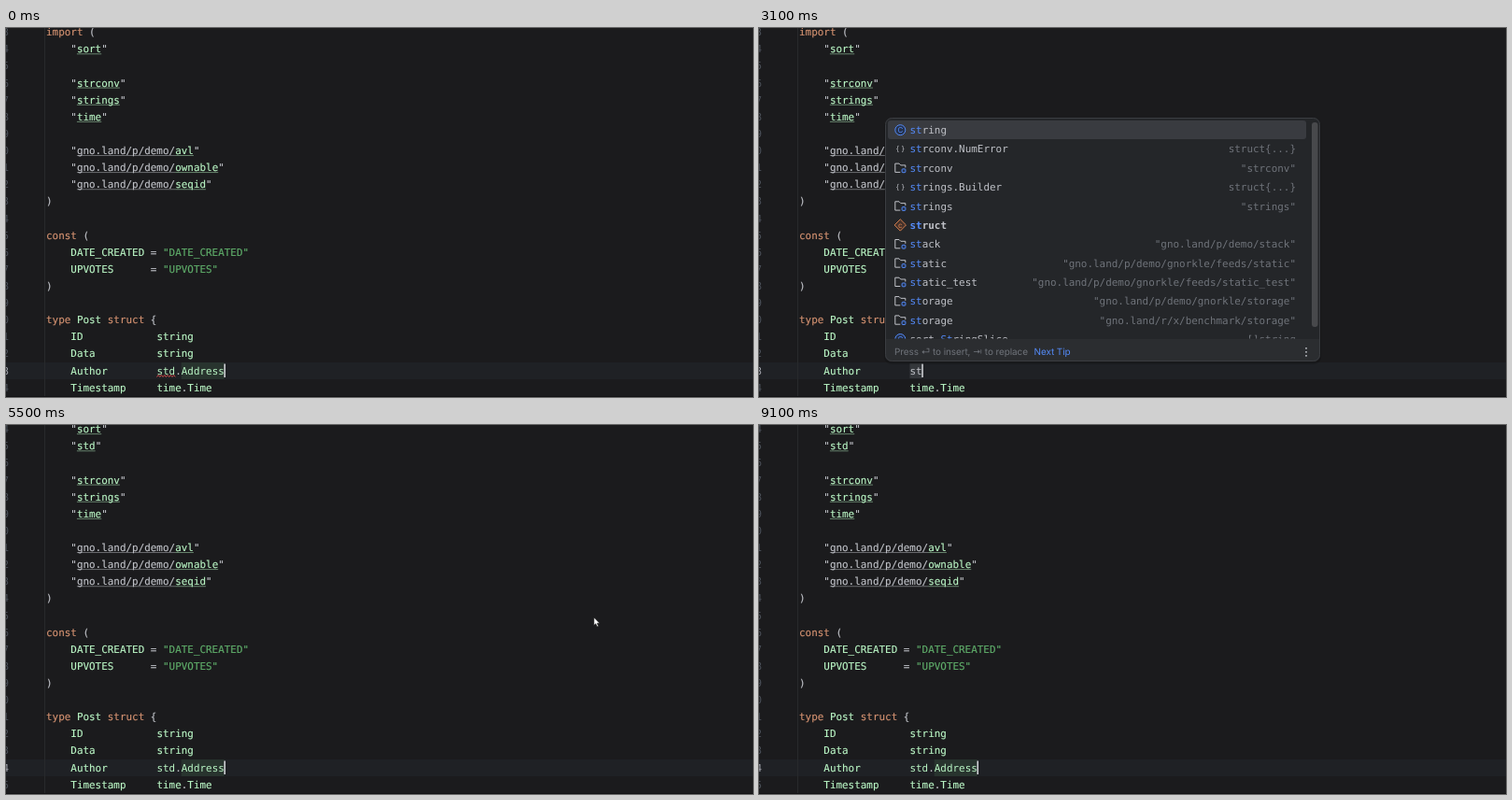
Recreate the animation shown at these times as an HTML page. Size 800 px wide and 395 px high, loop 9.2 s.

```html
<!DOCTYPE html>
<html lang="en">
<head>
<meta charset="utf-8">
<title>Code completion</title>
<style>
  html, body { margin: 0; width: 100%; height: 100%; overflow: hidden; background: #1b1b1d; }
  svg { display: block; width: 800px; height: 395px; }
  text { white-space: pre; text-rendering: geometricPrecision; }
  .mono { font: 10.93px "JetBrains Mono", "DejaVu Sans Mono", "Noto Sans Mono", monospace; }
  .bold { font-weight: 700; }
  .ui { font: 9.95px Inter, "DejaVu Sans", sans-serif; letter-spacing: -.08px; }
  .icon { font: 8px Inter, sans-serif; text-anchor: middle; }
</style>
</head>
<body>
<svg id="stage" viewBox="0 0 800 395"></svg>
<script>
const LOOP = 9200, STEP = 100;
const CW = 6.58, LEFT = 43, TOP = 4.3, LINE = 18.12, ROW = 20.35, BASE = 3.9;
const C = {
  plain: '#bfc1c7', green: '#b9f5c4', string: '#5fad6a', key: '#d39170',
  blue: '#548af7', dim: '#6f737a', red: '#db5c5c', orange: '#d5804f'
};
const TOKEN = { k: C.key, g: C.green, s: C.string, u: C.green, v: C.plain };

const stage = document.getElementById('stage');

function el(parent, tag, attrs = {}, text) {
  const node = document.createElementNS('http://www.w3.org/2000/svg', tag);
  for (const name in attrs) node.setAttribute(name, attrs[name]);
  if (text !== undefined) node.textContent = text;
  return parent.appendChild(node);
}
const rect = (p, x, y, width, height, fill, rx = 0) =>
  el(p, 'rect', { x, y, width, height, fill, rx });
const label = (p, x, y, text, fill, more = {}) =>
  el(p, 'text', { class: 'mono', x, y, fill, ...more }, text);
const show = (node, on) => node.setAttribute('visibility', on ? 'visible' : 'hidden');
const colX = col => LEFT + col * CW;
const rowY = row => TOP + row * LINE;

// Markup: [k:text] sets the token kind; the rest is plain.
function codeLine(parent, row, source) {
  let col = 0;
  for (const part of source.match(/\[\w:[^\]]*\]|[^\[]+/g) || []) {
    const token = part.match(/^\[(\w):(.*)\]$/);
    const kind = token && token[1], text = token ? token[2] : part;
    const fill = TOKEN[kind] || C.plain, x = colX(col);
    const lead = text.length - text.trimStart().length;
    label(parent, x + lead * CW, rowY(row) + BASE, text.trimStart(), fill,
      { stroke: fill, 'stroke-width': .15 });
    if (kind === 'u' || kind === 'v')
      rect(parent, x, rowY(row) + 5, text.length * CW, .8, fill).setAttribute('opacity', .6);
    col += text.length;
  }
}

function header(lines, firstNumber) {
  const g = el(stage, 'g');
  lines.forEach((line, i) => codeLine(g, i, line));
  for (let i = 0; i < 22; i++)
    label(g, -3.6, rowY(i) + BASE, (firstNumber + i) % 10, i === 20 ? '#a1a3ab' : '#4b5059');
  return g;
}

// Editor
rect(stage, 0, 0, 800, 395, '#1b1b1d');
rect(stage, 0, 358, 800, 18, '#1f2125');
rect(stage, 41, 0, 1, 395, '#28292c');
const nameMark = rect(stage, colX(22), 358, 0, 18, '#28342e');
const prefixMark = rect(stage, colX(18), 359, 2 * CW, 16, '#34373b');

const before = header(['[k:import] (', '    "[u:sort]"'], 3);
const after = header(['    "[u:sort]"', '    "[u:std]"'], 4);

[
  '    "[u:strconv]"',
  '    "[u:strings]"',
  '    "[u:time]"',
  '',
  '    "[v:gno.land/p/demo/][u:avl]"',
  '    "[v:gno.land/p/demo/][u:ownable]"',
  '    "[v:gno.land/p/demo/][u:seqid]"',
  ')',
  '',
  '[k:const] (',
  '    [g:DATE_CREATED] = [s:"DATE_CREATED"]',
  '    [g:UPVOTES]      = [s:"UPVOTES"]',
  ')',
  '',
  '[k:type] [g:Post] [k:struct] {',
  '    [g:ID]            [g:string]',
  '    [g:Data]          [g:string]',
  '    [g:Author]',
  '    [g:Timestamp]     [g:time].[g:Time]'
].forEach((line, i) => codeLine(stage, i + 3, line));

const typedY = rowY(20) + BASE;
const pkg = label(stage, colX(18), typedY, '', C.green);
const dot = label(stage, colX(21), typedY, '.', C.plain);
const member = label(stage, colX(22), typedY, '', C.green);
const squiggle = el(stage, 'path', {
  d: 'M161.5 373.5' + 'l1.65 -2l1.65 2'.repeat(6), fill: 'none', stroke: '#e0504f', 'stroke-width': .9
});
const caret = rect(stage, 0, 359.5, 1.5, 14.5, '#d8dade');
rect(stage, 0, 394, 800, 1, '#111113');

// Completion popups
function icon(p, kind, x, y) {
  const letter = (text, fill) => el(p, 'text', { class: 'icon', x, y: y + 2.9, fill }, text);
  const disc = (text, color, fill) => {
    el(p, 'circle', { cx: x, cy: y, r: 5.5, fill, stroke: color });
    letter(text, color);
  };
  if (kind === 'C') disc('C', C.blue, '#25324d');
  if (kind === 'f') disc('f', C.red, '#402929');
  if (kind === 'K') {
    el(p, 'path', { d: `M${x} ${y - 6.2}l6.2 6.2l-6.2 6.2l-6.2 -6.2z`, fill: '#45322b',
      stroke: C.orange, 'stroke-linejoin': 'round' });
    letter('c', C.orange);
  }
  if (kind === 'B') letter('{ }', C.plain);
  if (kind === 'P') {
    el(p, 'path', { d: `M${x + 5.5} ${y - .5}v-2.5h-5l-1.8 -1.8h-4.2v9.3h5.5`, fill: 'none',
      stroke: C.plain, 'stroke-linejoin': 'round' });
    el(p, 'rect', { x: x + 1.8, y: y + 1, width: 3.8, height: 3.8, rx: .8,
      fill: '#25324d', stroke: C.blue });
  }
}

// The matched part of a name is the prefix, or else its last occurrence.
function itemName(p, x, y, name, match) {
  const text = label(p, x, y, '', C.plain, { class: name === 'struct' ? 'mono bold' : 'mono' });
  const start = name.startsWith(match) ? 0 : name.toLowerCase().lastIndexOf(match);
  const end = start + match.length;
  el(text, 'tspan', {}, name.slice(0, start));
  el(text, 'tspan', { fill: C.blue }, name.slice(start, end));
  el(text, 'tspan', {}, name.slice(end));
}

function popup(x, items, match, hint, linkX, thumb) {
  const g = el(stage, 'g');
  el(g, 'rect', { x: x - 1, y: 97, width: 468, height: 263, rx: 8, fill: '#000', opacity: .18 });
  rect(g, x, 96, 466, 261, '#242629', 7);
  const list = el(g, 'svg', { x: 0, y: 0, width: 800, height: 332.5 });
  rect(list, x + 3, 99, 448, 20, '#393b40', 3);
  items.forEach(([kind, name, info], i) => {
    const y = 109.2 + i * ROW;
    icon(list, kind, x + 16.3, y);
    itemName(list, x + 26.5, y + BASE, name, match);
    label(list, x + 440, y + BASE, info, C.dim, { 'text-anchor': 'end' });
  });
  rect(g, x + 457, 101, 6.5, thumb, '#48494c', 3);
  el(g, 'path', { d: `M${x} 333h466v17a7 7 0 0 1 -7 7h-452a7 7 0 0 1 -7 -7z`, fill: '#2b2d30' });
  el(g, 'rect', { x: x + .5, y: 96.5, width: 465, height: 260, rx: 7, fill: 'none', stroke: '#3b3d41' });
  label(g, x + 10, 350, hint, C.dim, { class: 'ui' });
  label(g, x + linkX, 350, 'Next Tip', C.blue, { class: 'ui' });
  for (const y of [342.8, 346.8, 350.8]) el(g, 'circle', { cx: x + 451, cy: y, r: .9, fill: '#ced0d6' });
  return g;
}

const words = popup(135, [
  ['C', 'string', ''],
  ['B', 'strconv.NumError', 'struct{...}'],
  ['P', 'strconv', '"strconv"'],
  ['B', 'strings.Builder', 'struct{...}'],
  ['P', 'strings', '"strings"'],
  ['K', 'struct', ''],
  ['P', 'stack', '"gno.land/p/demo/stack"'],
  ['P', 'static', '"gno.land/p/demo/gnorkle/feeds/static"'],
  ['P', 'static_test', '"gno.land/p/demo/gnorkle/feeds/static_test"'],
  ['P', 'storage', '"gno.land/p/demo/gnorkle/storage"'],
  ['P', 'storage', '"gno.land/r/x/benchmark/storage"'],
  ['C', 'sort.StringSlice', '[]string']
], 'st', 'Press ⏎ to insert, ⇥ to replace', 159.5, 219);

const kinds = { C: 'type', f: 'func', K: 'const' };
const members = popup(161.3, [
  'C Address', 'C AddressList', 'C AddressSet', 'f AssertOriginCall', 'f AssertOriginCall',
  'C Banker', 'C BankerType', 'K BankerTypeOrigSend', 'K BankerTypeReadonly',
  'K BankerTypeRealmIssue', 'K BankerTypeRealmSend', 'C Coin'
].map(item => {
  const [kind, name] = item.split(' ');
  return [kind, name, `${kinds[kind]} (from "std")`];
}), '', 'Press ⌃. to choose the selected (or first) suggestion and insert a dot afterwards', 386.5, 49);

const mouse = el(stage, 'path', {
  d: 'M0 0v8.6l2 -1.8l1.4 3.2l1.5 -.7l-1.4 -3h2.7z', fill: '#fff', stroke: '#111', 'stroke-width': .6
});

// Motion: [time, typed length] and [time, x, y]
const TYPED = 'std.Address';
const KEYS = [
  [-200, 11], [1100, 10], [1200, 9], [1300, 8], [1400, 7], [1500, 6], [1600, 5],
  [1800, 4], [1900, 3], [2000, 2], [2100, 1], [2200, 0],
  [2700, 1], [2800, 2], [3500, 3], [3700, 4], [5100, 11]
];
const PATH = [
  [5400, 766, 250], [5700, 240, 80], [5900, 112, 34], [6300, 106, 37],
  [6500, 107, 36], [7000, 104, 35], [7700, 107, 36], [8100, 280, 120]
];

function along(t) {
  const i = PATH.findIndex(p => p[0] > t);
  if (i < 1) return null;
  const [a, b] = [PATH[i - 1], PATH[i]];
  const u = (t - a[0]) / (b[0] - a[0]), e = u * u * (3 - 2 * u);
  return [a[1] + (b[1] - a[1]) * e, a[2] + (b[2] - a[2]) * e];
}

function draw(t) {
  const [since, length] = KEYS.filter(k => k[0] <= t).pop();
  const typed = TYPED.slice(0, length);
  const retyping = t >= 2700 && t < 3500;

  pkg.textContent = typed.slice(0, 3);
  pkg.setAttribute('fill', retyping ? C.plain : C.green);
  member.textContent = typed.slice(4);
  show(dot, length > 3);
  nameMark.setAttribute('width', Math.max(0, length - 4) * CW);
  show(squiggle, t < 1900);
  caret.setAttribute('x', colX(18 + length) - .3);
  show(caret, (t - since) % 1000 < 500);

  show(before, t < 5100);
  show(after, t >= 5100);
  show(words, t >= 2900 && t < 3700);
  show(prefixMark, t >= 2900 && t < 3500);
  show(members, t >= 3800 && t < 4900);

  const spot = along(t);
  show(mouse, spot);
  if (spot) mouse.setAttribute('transform', `translate(${spot[0]} ${spot[1]})`);
}

const origin = performance.now();
function tick() {
  const t = Math.max(0, performance.now() - origin) % LOOP;
  draw(Math.floor(t / STEP) * STEP);
  requestAnimationFrame(tick);
}
tick();
</script>
</body>
</html>
```
